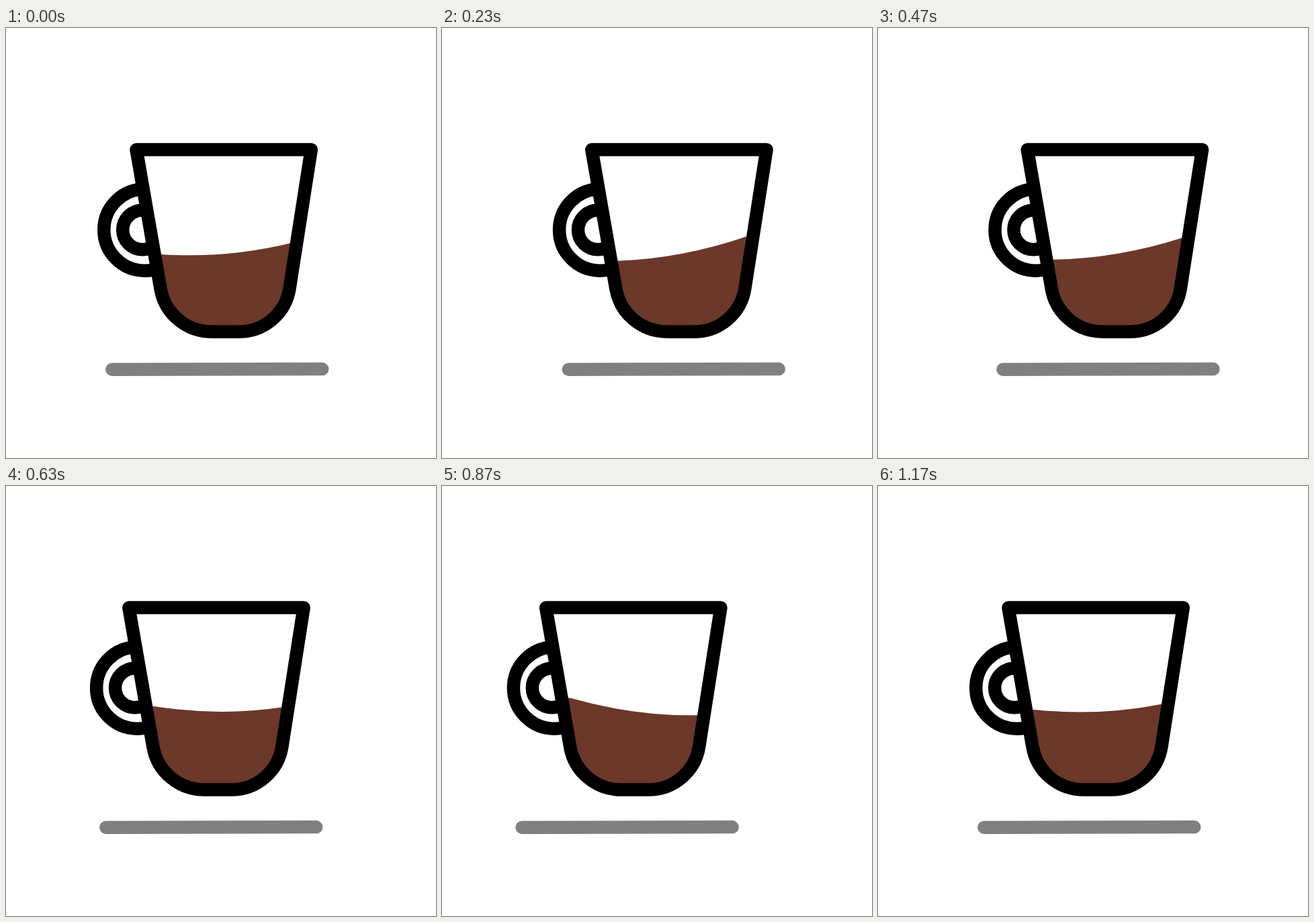
Recreate the animation shown at these times as an HTML page. Size 640 by 640 pixels, loop 1.21 s.

```html
<!DOCTYPE html>
<html lang="en">
<head>
<meta charset="utf-8">
<title>Coffee cup</title>
<style>
  html, body { margin: 0; width: 100%; height: 100%; overflow: hidden; background: #fff; }
  svg { display: block; width: 100vw; height: 100vh; }
  .line { fill: none; stroke: #000; stroke-width: 19.5; stroke-linecap: round; stroke-linejoin: round; }
</style>
</head>
<body>
<svg viewBox="0 0 640 640">
  <defs>
    <path id="bowl" d="M194 181H454.3L422 388A76 76 0 0 1 347 452H306A77 77 0 0 1 230 388Z"/>
  </defs>
  <path id="saucer" class="line" d="M157.8 508.2L470.7 507.6" style="stroke: #808080"/>
  <g id="cup">
    <circle class="line" cx="206.5" cy="300.5" r="60.7"/>
    <circle class="line" cx="203" cy="300.5" r="29.3"/>
    <use href="#bowl" fill="#fff"/>
    <path id="coffee" fill="#6b3829"/>
    <use href="#bowl" class="line"/>
  </g>
</svg>
<script>
const LOOP = 1210, LEVEL = 328.4, SAG = 15;

// [step, value] keys, linear in between
const cupX = [[0, 0], [10, 48], [20, -50.6], [29, 0]];
const saucerX = [[0, 0], [6, 30.5], [10, 48.3], [12, 28.2], [16, -9], [20, -49.7], [29, 0]];
const tilt = [[0, 17], [10, 49.5], [20, -35.3], [29, 8.5]];

const [saucer, cup, coffee] = ['saucer', 'cup', 'coffee'].map(id => document.getElementById(id));

function valueAt(keys, step) {
  const i = Math.max(1, keys.findIndex(key => key[0] >= step));
  const [s0, v0] = keys[i - 1], [s1, v1] = keys[i];
  return v0 + (v1 - v0) * (step - s0) / (s1 - s0);
}

// 25 steps per second shown on a 30 per second clock: every sixth tick holds
function stepAt(ms) {
  const tick = Math.min(35, Math.floor((ms + 4) * 0.03));
  return tick - Math.floor((tick + 3) / 6);
}

function draw(now) {
  const step = stepAt(now % LOOP);
  const half = valueAt(tilt, step) / 2;
  const left = LEVEL + half, right = LEVEL - half;
  cup.setAttribute('transform', `translate(${valueAt(cupX, step)})`);
  saucer.setAttribute('transform', `translate(${valueAt(saucerX, step)})`);
  coffee.setAttribute('d',
    `M222 ${left}H230.5Q327.5 ${LEVEL + SAG} 424.5 ${right}H430L422 388A76 76 0 0 1 347 452H306A77 77 0 0 1 230 388Z`);
  requestAnimationFrame(draw);
}
draw(0);
</script>
</body>
</html>
```
